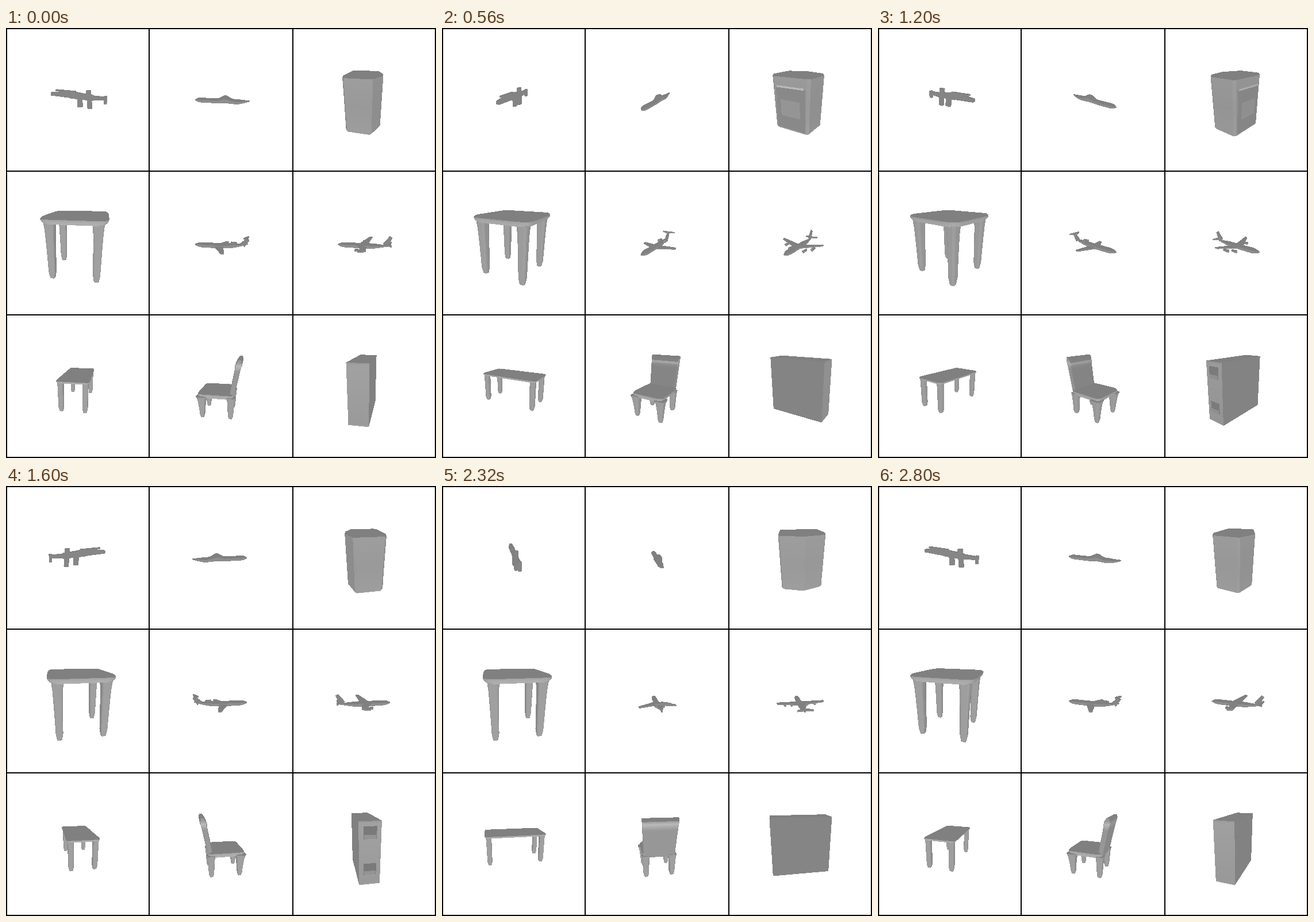
These frames come from a looping animation (748 by 748 pixels, 2.88 s). An HTML page with a canvas:

```html
<!DOCTYPE html>
<html lang="en">
<head>
<meta charset="utf-8">
<title>Turntable grid</title>
<style>
  html, body { margin: 0; width: 100%; height: 100%; overflow: hidden; background: #fff; }
  canvas { display: block; width: 748px; height: 748px; }
</style>
</head>
<body>
<canvas id="stage" width="748" height="748"></canvas>
<script>
const SIZE = 748, STEP = 80, STEPS = 36;
const DIST = 260, TILT = Math.PI / 10;
const SIN = Math.sin(TILT), COS = Math.cos(TILT);
const center = i => SIZE / 2 + (i - 1) * 248.7;
const clamp = (v, a, b) => Math.min(b, Math.max(a, v));
const mix = (a, b, t) => a + (b - a) * t;
const bump = (t, at, width) => Math.exp(-(((t - at) / width) ** 2));
const bend = (v, q) => Math.sign(v) * Math.abs(v) ** q;
const range = (n, make) => Array.from({ length: n + 1 }, (_, i) => make(i / n));
const both = make => [1, -1].flatMap(make);

// ---- Geometry: a face is a list of [x, y, z, lightness]; x is forward, y is up.

// Rounded rectangle lying flat; q from 0 (square) to 1 (ellipse)
function ring(x, y, z, hx, hz, a, q = 0.3, n = 24) {
  return Array.from({ length: n }, (_, i) => {
    const t = (i + 0.5) * 2 * Math.PI / n;
    return [x + hx * bend(Math.cos(t), q), y, z + hz * bend(Math.sin(t), q), a];
  });
}

// Ellipse across the forward axis
const hoop = (x, y, z, ry, rz, a) => ring(0, 0, 0, ry, rz, a, 1, 12)
  .map(([u, , v]) => [x, y + u, z + v, a]);

// Skin between rings, closed at both ends
function loft(rings) {
  const faces = [rings[0], rings[rings.length - 1]];
  for (let k = 1; k < rings.length; k++) {
    const p = rings[k - 1], q = rings[k];
    p.forEach((v, i) => {
      const j = (i + 1) % p.length;
      faces.push([v, p[j], q[j], q[i]]);
    });
  }
  return faces;
}

const tube = (x0, x1, section) => loft(range(20, t => {
  const { y, z = 0, r, flat = 1 } = section(t);
  return hoop(mix(x0, x1, t), y, z, r, r * flat, 16);
}));

// Flat tapered bar standing in the x-y plane
function beam(x0, y0, x1, y1, r0, r1, h = 2.8) {
  const len = Math.hypot(x1 - x0, y1 - y0);
  const u = -(y1 - y0) / len, v = (x1 - x0) / len;
  const outline = [[x0, y0, r0], [x1, y1, r1], [x1, y1, -r1], [x0, y0, -r0]];
  return loft([-h, h].map(z => outline.map(([x, y, r]) => [x + u * r, y + v * r, z, 6])));
}

// Swept surface from the body to a tip
function wing(x, y, chord, sweep, span, rise) {
  const tip = chord * 0.3;
  return loft([1.1, -1.1].map(d => [
    [x, y + d, 0, 12], [x - sweep, y + rise + d, span, 12],
    [x - sweep - tip, y + rise + d, span, 12], [x - chord, y + d, 0, 12]
  ]));
}

// Board with a rounded edge that turns inwards and catches light below
const slab = (x, top, thick, hx, hz, q) => loft(range(4, t => {
  const inset = thick * (0.9 * Math.max(0, t - 0.3) ** 2 + 0.8 * Math.max(0, 0.25 - t));
  return ring(x, top - thick * t, 0, hx - inset, hz - inset, mix(18, 75, t), q);
}));

const leg = (x, z, top, foot, r, slim, a = 32) => loft(range(8, t => {
  const w = r * mix(1, slim, Math.sqrt(t)) * (t === 1 ? 0.7 : 1);
  return ring(x, mix(top, foot, t), z, w, w, a, 0.45, 12);
}));

function table(hx, hz, top, thick, foot, r, slim, q) {
  const gap = r * 0.5 + thick;
  return [
    ...slab(0, top, thick, hx, hz, q),
    ...both(i => both(j => leg((hx - gap) * i, (hz - gap) * j, top - thick + 1, foot, r, slim)))
  ];
}

function rifle() {
  return [
    beam(48, 9, 10, 9.5, 2.5, 6),
    beam(12, 9, -26, 5, 6, 4.5),
    beam(39, 16, 4, 14, 1.2, 1.5),
    beam(-24, 5, -47, 5, 4, 2.5),
    beam(-47, 9, -47, -4.5, 2.5, 2.5),
    beam(-3, 5, -4, -12, 4, 4.5),
    beam(-18, 18, -21, -14, 4, 4)
  ].flat();
}

const blaster = () => tube(47, -49, t => {
  const hump = bump(t, 0.57, 0.09);
  const r = 4.3 * Math.min(1, Math.sqrt(12 * t + 0.05), 4 * (1 - t) + 0.25);
  return { y: -2 + 4 * hump + 3 * t ** 8, r: r + 2.6 * hump, flat: 1.1 };
});

function bin() {
  const plan = [[26, -34], [26, 30], [-17, 34], [-30, 0], [-20, -35]];
  const grow = y => 1.04 + y / 1100;
  const rounded = plan.flatMap((p, i) => {
    const q = plan[(i + 1) % plan.length];
    return [0.06, 0.94].map(t => p.map((v, k) => mix(v, q[k], t)));
  });
  const level = (y, s, a) => rounded.map(([x, z]) => [x * s, y, z * s, a]);
  const patch = (y0, y1, half, a, lift) => [[y0, -1], [y0, 1], [y1, 1], [y1, -1]]
    .map(([y, side]) => [26 * grow(y) + lift, y, half * side - 2, a]);
  return [
    ...loft([level(46, 1.04, 36), ...range(6, t => {
      const y = mix(43, -46, t);
      return level(y, grow(y), 26 + 8 * Math.abs(t - 0.5));
    }), level(-48.5, 0.94, 60)]),
    patch(-45, 27, 27, 10, 0.7),
    patch(26, 29, 25, 65, 1.2),
    patch(-22, 6, 18, 24, 1.2)
  ];
}

// fin: height of its tip, tail: height of the rear wing, engines: list of [x, y, z]
function plane({ span, rise, fin, tail, lift, engines }) {
  return [
    ...tube(47.5, -46, t => ({
      y: -5.3 + lift * t ** 4,
      r: 4.7 * Math.min(1, Math.sqrt(8 * t + 0.04), 2.6 * (1 - t) + 0.15)
    })),
    ...beam(-37, -2, -46, fin, 5, 2.5, 1.2),
    ...both(s => [
      ...wing(13, -6, 17, 18, span * s, rise),
      ...wing(-38, tail, 8, 7, 12 * s, 0),
      ...engines.flatMap(([x, y, z]) =>
        tube(x + 5, x - 5, t => ({ y, z: z * s, r: 2.7 - 0.7 * t })))
    ])
  ];
}

function chair() {
  return [
    ...slab(5, -4, 11, 30, 28.5, 0.2),
    ...loft(range(14, t => {
      const roll = bump(t, 0.9, 0.09);
      const w = 4.3 + 1.2 * roll - 2 * t ** 20;
      return ring(-20 - 12 * t, mix(-14, 49.5, t), 0, w, 25.5 + 2 * t, 24 + 40 * bump(t, 0.84, 0.06), 0.2);
    })),
    ...both(s => [...leg(28, 23 * s, -11, -50, 9, 0.4), ...leg(-20, 22 * s, -11, -49, 7, 0.6)])
  ];
}

function bookcase() {
  const box = (y, a) => ring(0, y, 0, 16, 49, a, 0, 4);
  // The broad sides stay dark
  const broad = f => f.every(p => Math.abs(p[0] - f[0][0]) < 0.1);
  const shell = loft([box(48, 24), box(45, 34), box(-47, 26), box(-49, 45)])
    .map(f => broad(f) ? f.map(([x, y, z]) => [x, y, z, 5]) : f);
  const slot = (y, h, w, a, z) => [[-w, y], [w, y], [w, y + h], [-w, y + h]]
    .map(([x, v]) => [x, v, z, a]);
  return [...shell, ...[23, -32].flatMap(y => [
    slot(y, 18, 9.5, -6, -49.5), slot(y, 6, 8.5, 20, -49.9)
  ])];
}

const models = [
  rifle(),
  blaster(),
  bin(),
  table(50, 50, 50, 10, -50, 8.5, 0.66, 0.27),
  plane({ span: 32, rise: -1, fin: 9, tail: 10, lift: 6, engines: [[-22, -1, 6]] }),
  plane({ span: 40, rise: 6, fin: 13, tail: 0, lift: 3, engines: [[8, -9, 14], [1, -6, 26]] }),
  table(24.5, 49, 22, 4, -27, 4.4, 0.9, 0.12),
  chair(),
  bookcase()
];

// ---- Depth-buffered drawing

const ctx = document.getElementById('stage').getContext('2d');
const image = ctx.createImageData(SIZE, SIZE);
const pixels = new Uint32Array(image.data.buffer);
const depth = new Float32Array(SIZE * SIZE);

const cross = (a, b, c) => (b.x - a.x) * (c.y - a.y) - (c.x - a.x) * (b.y - a.y);

// How strongly a face turned to the viewer picks up light
function facing(pts) {
  let nx = 0, ny = 0, nz = 0;
  pts.forEach((p, i) => {
    const q = pts[(i + 1) % pts.length];
    nx += (p[1] - q[1]) * (p[2] + q[2]);
    ny += (p[2] - q[2]) * (p[0] + q[0]);
    nz += (p[0] - q[0]) * (p[1] + q[1]);
  });
  const [x, y, z] = pts[0];
  const side = -nx * x + ny * (DIST * SIN - y) + nz * (DIST * COS - z);
  const len = (Math.hypot(nx, ny, nz) || 1) * (side < 0 ? -1 : 1);
  return clamp(nz / len, 0, 1) * clamp(1 - 4 * ny / len, 0, 1);
}

function project([X, Y, Z, a], cx, cy, light) {
  const k = 1 / (1 - (Y * SIN + Z * COS) / DIST);
  return { x: cx + X * k, y: cy + (Z * SIN - Y * COS) * k, w: k, s: 128 + a * light };
}

function fill(v) {
  // The widest corner triple gives the most stable gradients
  const a = v[0];
  let b, c, det = 0;
  for (let i = 1; i < v.length; i++) {
    for (let j = i + 1; j < v.length; j++) {
      const d = cross(a, v[i], v[j]);
      if (Math.abs(d) > Math.abs(det)) { det = d; b = v[i]; c = v[j]; }
    }
  }
  if (Math.abs(det) < 0.05) return;

  const gradient = key => {
    const db = b[key] - a[key], dc = c[key] - a[key];
    const gx = (db * (c.y - a.y) - dc * (b.y - a.y)) / det;
    const gy = (dc * (b.x - a.x) - db * (c.x - a.x)) / det;
    const all = v.map(p => p[key]), lo = Math.min(...all), hi = Math.max(...all);
    return (x, y) => clamp(a[key] + gx * (x - a.x) + gy * (y - a.y), lo, hi);
  };
  const near = gradient('w'), shade = gradient('s');
  const ys = v.map(p => p.y);
  const end = Math.ceil(Math.max(...ys) - 0.5);

  for (let row = Math.ceil(Math.min(...ys) - 0.5); row < end; row++) {
    const y = row + 0.5, cuts = [];
    v.forEach((p, i) => {
      const q = v[(i + 1) % v.length];
      if ((p.y <= y) !== (q.y <= y)) cuts.push(p.x + (y - p.y) / (q.y - p.y) * (q.x - p.x));
    });
    cuts.sort((m, n) => m - n);
    for (let i = 0; i + 1 < cuts.length; i += 2) {
      const stop = Math.ceil(cuts[i + 1] - 0.5);
      for (let col = Math.ceil(cuts[i] - 0.5); col < stop; col++) {
        const at = row * SIZE + col, w = near(col + 0.5, y);
        if (w <= depth[at]) continue;
        depth[at] = w;
        pixels[at] = 0xff000000 | Math.round(shade(col + 0.5, y)) * 0x010101;
      }
    }
  }
}

function draw(step) {
  const turn = (step - 1) * 2 * Math.PI / STEPS;
  const c = Math.cos(turn), s = Math.sin(turn);
  pixels.fill(0xffffffff);
  depth.fill(0);
  models.forEach((faces, i) => {
    const cx = center(i % 3), cy = center(Math.floor(i / 3));
    for (const face of faces) {
      const pts = face.map(([x, y, z, a]) => [z * s - x * c, y, x * s + z * c, a]);
      const light = facing(pts);
      fill(pts.map(p => project(p, cx, cy, light)));
    }
  });
  ctx.putImageData(image, 0, 0);
  ctx.fillStyle = '#000';
  for (const p of [0, 248, 498, 746]) {
    ctx.fillRect(p, 0, 2, SIZE);
    ctx.fillRect(0, p, SIZE, 2);
  }
}

const start = performance.now();
let shown = -1;

function tick() {
  const step = Math.floor((performance.now() - start) / STEP) % STEPS;
  if (step !== shown) draw(shown = step);
  requestAnimationFrame(tick);
}
tick();
</script>
</body>
</html>
```
